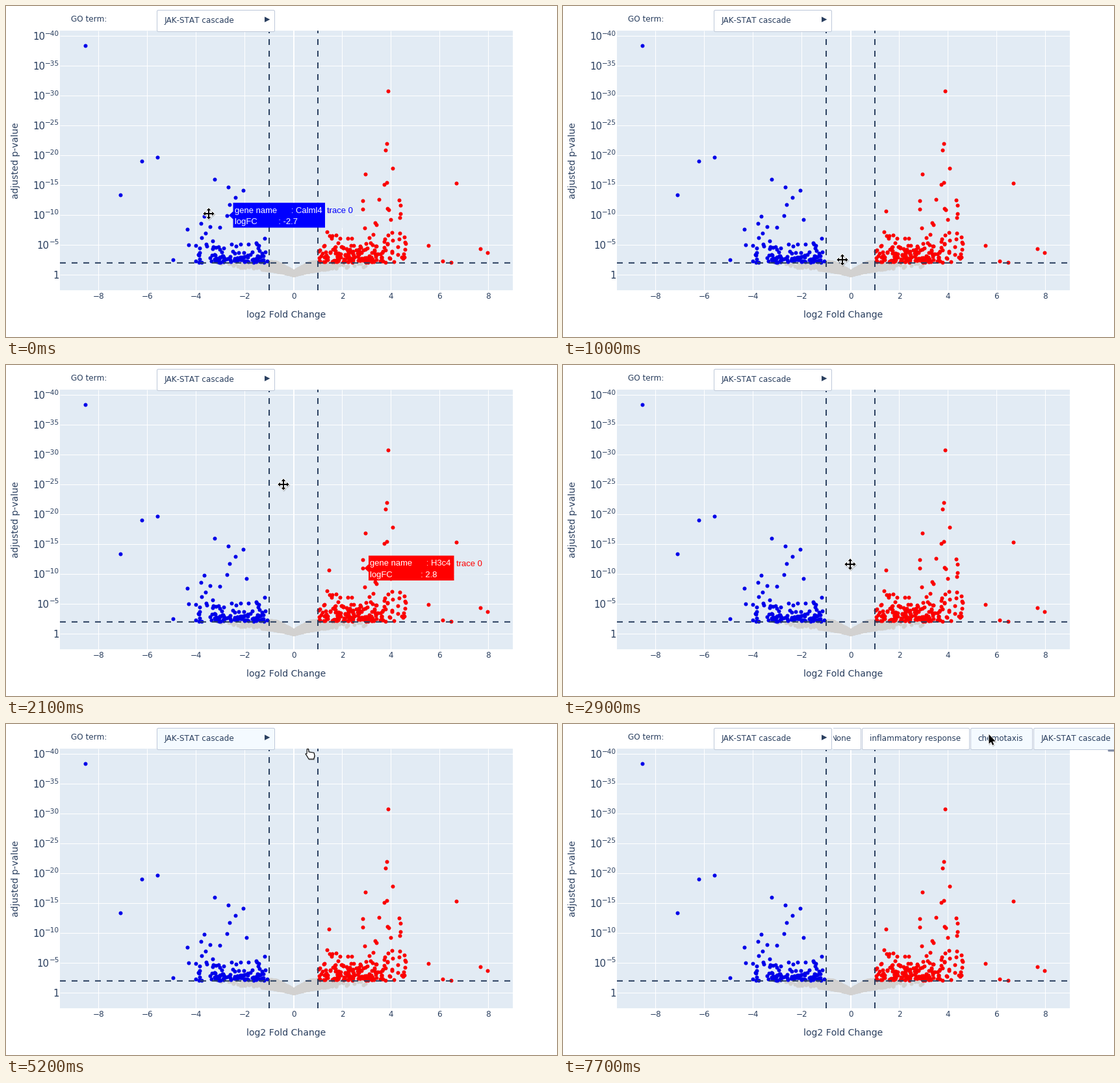
Recreate the animation shown at these times as a matplotlib script. Size 848 px wide and 510 px high, loop 8 s.

```python
import numpy as np
import matplotlib.pyplot as plt
from matplotlib.animation import FuncAnimation
from matplotlib.patches import FancyBboxPatch, Polygon, Rectangle
from matplotlib.transforms import Affine2D

W, H, DPI = 848, 510, 64
PX = 72 / DPI  # points per pixel
STEP, TOTAL = 100, 8000

INK, PAPER, PLOT = "#2a3f5f", "white", "#e2ebf4"
EDGE, LIT, BAR = "#bec8d9", "#f4faff", "#808ba4"
BLUE, RED, GREY = "#0000e8", "#fa0000", "#d2d1d0"

L, R, T, B = 83, 780, 38, 438
X0, XU = 442.5, 37.47   # zero and unit of the fold-change axis
Y0, YU = 414.2, 9.19    # p = 1 and one decade

plt.rcParams["text.kerning_factor"] = 6  # plain advances

fig = plt.figure(figsize=(W / DPI, H / DPI), dpi=DPI, facecolor=PAPER)
ax = fig.add_axes([0, 0, 1, 1])
ax.set(xlim=(0, W), ylim=(H, 0))
ax.axis("off")


def text(x, y, s, size=12, color=INK, ha="left", z=5, **kw):
    return ax.text(x, y, s, fontsize=size * PX, color=color, ha=ha,
                   va="baseline", zorder=z, **kw)


def line(xs, ys, color, width, z, **kw):
    ax.plot(xs, ys, color=color, lw=width * PX, zorder=z,
            solid_capstyle="butt", **kw)


def genes(fold, logp, color, z):
    ax.scatter(X0 + XU * np.asarray(fold), Y0 - YU * np.asarray(logp),
               s=(6 * PX) ** 2, color=color, linewidths=0, zorder=z,
               snap=False)


# ---- axes
ax.add_patch(Rectangle((L, T), R - L, B - T, fc=PLOT, lw=0, zorder=0))
for v in range(-8, 9, 2):
    x = X0 + v * XU
    line([np.floor(x)] * 2, [T, B], "white", 1, 1)
    text(x, 451, str(v).replace("-", "−"), ha="center")
line([X0, X0], [T, B], "white", 2, 1)
for e in range(0, 41, 5):
    y = Y0 - e * YU
    line([L, R], [np.floor(y)] * 2, "white", 1, 1)
    sup_width = 0
    if e:
        sup_width = (0.838 + 0.636 * len(str(e))) * 10.5
        text(82, y - 1, f"−{e}", 10.5, ha="right")
    text(82 - sup_width, y + 5.3, "10" if e else "1", 15, ha="right")
text(431.5, 480, "log2 Fold Change", 14, ha="center")
text(19, 238, "adjusted p-value", 14, ha="center", rotation=90,
     rotation_mode="anchor")
text(100, 24, "GO term:")

# ---- genes
rng = np.random.default_rng(11)

# not significant: a shallow V, thicker away from the centre
fold = np.concatenate([rng.normal(0, 0.6, 1800), rng.normal(0, 1.3, 200)])
fold = fold[np.abs(fold) < 3.3]
a = np.abs(fold)
floor = 1.4 * (1 - np.exp(-a / 1.2))
logp = floor + np.clip(0.5 + 1.5 * a, 0, 1.5) * rng.random(a.size) ** 1.3
genes(fold, np.where(a > 1, np.minimum(logp, 1.9), logp), GREY, 2)


def cloud(sign, n, spread, reach, height):
    """Significant genes, crowded near both thresholds."""
    f = 1.03 + reach * rng.random(n) ** spread
    p = 2.1 + np.minimum(rng.exponential(height, n), 4.5 * height)
    genes(sign * f, p, BLUE if sign < 0 else RED, 3)


cloud(-1, 85, 1.2, 2.3, 0.8)
cloud(-1, 40, 0.7, 3.0, 2.8)
cloud(1, 135, 1.0, 2.7, 1.0)
cloud(1, 75, 0.6, 3.6, 2.9)

# the strongest genes of each side
genes([-8.56, -6.23, -5.58, -7.12, -3.25, -2.07, -2.64, -2.74, -3.68, -4.37,
       -4.31, -4.94],
      [38.4, 19.1, 19.7, 13.4, 16, 14.2, 11.8, 9.95, 9.8, 7.6, 5.05, 2.5],
      BLUE, 3)
genes([3.88, 3.84, 3.78, 4.06, 2.96, 3.84, 6.68, 2.85, 3.52, 2.83, 4.4, 5.54,
       7.66, 7.97, 6.12, 6.47],
      [30.8, 22, 20.9, 17.9, 16.9, 15.5, 15.4, 12.4, 12.6, 11, 10.3, 4.9,
       4.4, 3.7, 2.3, 2.1], RED, 3)

dash = dict(linestyle=(0, (4.5, 4.5)), snap=False)
for s in (-1, 1):
    line([X0 + s * XU] * 2, [B, T], INK, 2, 4, **dash)
line([L, R], [Y0 - 2 * YU] * 2, INK, 2, 4, **dash)


# ---- hover labels
def hover(x, y, right, color, rows):
    left, top, bottom = x + 9.5, y - 19.3, y + 19
    body = [(x + 3, y), (left, y - 6), (left, top), (right, top),
            (right, bottom), (left, bottom), (left, y + 6)]
    parts = [
        ax.add_patch(Rectangle((right, top), 46, bottom - top, fc=PLOT,
                               alpha=0.8, lw=0, zorder=6)),
        ax.add_patch(Polygon(body, fc=color, lw=0, zorder=7)),
        text(right + 3.5, y - 3.5, "trace 0", 13, color, z=8,
             family="Liberation Sans")]
    for k, row in enumerate(rows):
        parts.append(text(left + 2, y - 3.5 + 17 * k, row, 13, "white", z=8,
                          family="Liberation Sans"))
    return parts


tip_blue = hover(340, 322.5, 491, "#0000ff",
                 ["gene name      : Calml4", "logFC         : -2.7"])
tip_red = hover(548.5, 313, 689.5, "#ff0000",
                ["gene name      : H3c4", "logFC            : 2.8"])


# ---- dropdown
def button(x0, x1, label, z=10):
    box = FancyBboxPatch((x0, 6.5), x1 - x0, 33, fc=PAPER, ec=EDGE, lw=PX,
                         boxstyle="round,pad=0,rounding_size=2", zorder=z)
    ax.add_patch(box)
    return box, text(x0 + 11.3, 25.7, label, z=z + 0.1)


header, _ = button(232.5, 413.5, "JAK-STAT cascade", 12)
ax.add_patch(Polygon([(398, 16.5), (406.3, 20.8), (398, 25)], fc=INK, lw=0,
                     zorder=12.2))

none = button(401.5, 458.5, "None")
inflam = button(460.5, 625.5, "inflammatory response")
chemo = button(627.5, 722.5, "chemotaxis")
active = button(724.5, 900, "JAK-STAT cascade")
active[0].set_facecolor(LIT)

menu = [*none, *inflam, *chemo, *active]
window = Rectangle((416, 0), W - 416, 60, transform=ax.transData)
for part in menu:
    part.set_clip_on(True)
    part.set_clip_path(window)
menu.append(ax.add_patch(FancyBboxPatch(
    (838.5, 39.5), 40, 3, fc=BAR, lw=0, zorder=11,
    boxstyle="round,pad=0,rounding_size=1.5")))


# ---- pointers, drawn around (0, 0)
def shape(pts, fc, ec="none", lw=0, alpha=None, z=20):
    return ax.add_patch(Polygon(pts, fc=fc, ec=ec, lw=lw * PX, alpha=alpha,
                                joinstyle="round", zorder=z))


def dark_pointer(pts):
    return [shape(pts + (0.6, 1.2), "black", "black", 2, 0.18),
            shape(pts, "white", "white", 2, z=21),
            shape(pts, "black", z=22)]


arm = np.array([(-1, -1), (-1, -5), (-3.2, -5), (0, -8.7), (3.2, -5), (1, -5)])
turn = np.array([(0, 1), (-1, 0)])
cross = np.vstack([arm @ np.linalg.matrix_power(turn, k) for k in range(4)])
palm = np.array([(-4.7, -7.5), (-2.5, -7.5), (-2, -3), (6, -1.7), (7, 3),
                 (5.6, 8), (-2, 8), (-5, 3), (-7, 0), (-5, -0.4)])
wedge = np.array([(-4.5, -10.5), (-4.5, 4), (-1.2, 1), (1, 6), (3.2, 5),
                  (1.1, 0.2), (5.6, 0.2)])

pointers = {
    "move": dark_pointer(cross),
    "hand": [shape(palm + (0.6, 1.2), "black", "black", 1.5, 0.18),
             shape(palm, "white", "black", 1.1, z=21)],
    "arrow": dark_pointer(wedge),
}

# strokes of the pointer: start ms, end ms, where it arrives
START = (312, 320)
MOVES = [
    (0, 200, (312, 329)), (300, 700, (367, 371)), (700, 1000, (430, 391)),
    (1000, 1400, (524, 366)), (1400, 1600, (580, 273)),
    (1600, 1900, (608, 377)), (2000, 2100, (427, 184)),
    (2100, 2400, (415, 41)), (2500, 2900, (442, 307)),
    (3000, 3200, (441, 344)), (3500, 4300, (402, 31)),
    (4400, 4700, (418, 40)), (4900, 5200, (468, 46)),
    (5200, 5700, (485, 31)), (6000, 6500, (695, 25)),
    (6500, 6600, (660, 26.5))]


def pointer_at(t):
    pos = np.array(START, float)
    for t0, t1, goal in MOVES:
        pos += (np.array(goal) - pos) * np.clip((t - t0) / (t1 - t0), 0, 1)
    return pos


def show(parts, on):
    for part in parts:
        part.set_visible(on)


def draw(i):
    t = i * STEP
    x, y = pointer_at(t)
    kind = "move" if t < 4300 else "hand" if t < 7700 else "arrow"
    for name, parts in pointers.items():
        show(parts, name == kind)
        for part in parts:
            part.set_transform(Affine2D().translate(x, y) + ax.transData)

    show(tip_blue, t < 400)
    show(tip_red, t == 2100)
    show(menu, t >= 5300)
    header.set_facecolor(LIT if 4300 <= t < 5300 else PAPER)
    inflam[0].set_facecolor(LIT if 460 < x < 626 else PAPER)
    chemo[0].set_facecolor(LIT if 627 < x < 723 else PAPER)
    return []


anim = FuncAnimation(fig, draw, frames=TOTAL // STEP, interval=STEP,
                     repeat=True, repeat_delay=0)
plt.show()
```
